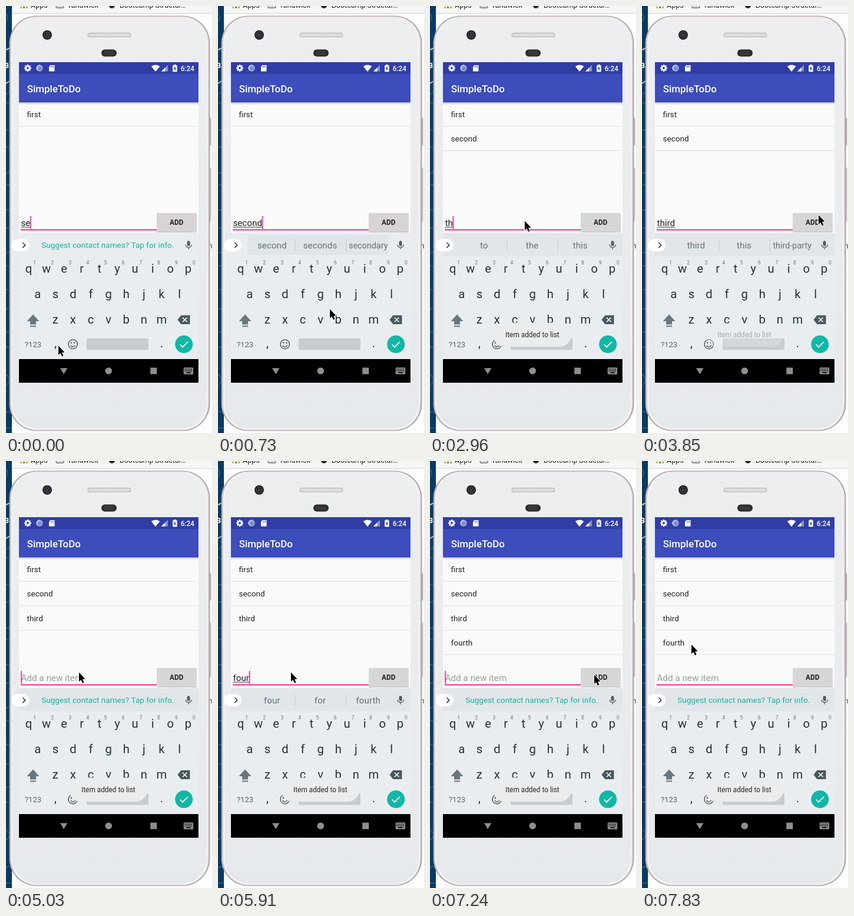
An HTML page with a canvas that plays this animation: 350 by 722 pixels, repeating every 8000 ms.

```html
<!DOCTYPE html>
<html lang="en">
<head>
<meta charset="utf-8">
<title>To-do list demo</title>
<style>
html, body { margin: 0; width: 100%; height: 100%; overflow: hidden; background: #fff; }
canvas { display: block; width: 350px; height: 722px; }
</style>
</head>
<body>
<canvas id="stage"></canvas>
<script>
const W = 350, H = 722, LOOP = 8000, STEP = 147.8, LAST = 53;
const canvas = document.getElementById('stage');
const ratio = window.devicePixelRatio || 1;
canvas.width = W * ratio;
canvas.height = H * ratio;
const ctx = canvas.getContext('2d');
const FONT = 'Roboto, "Open Sans", sans-serif';

// Timelines: [step, value]
const typed = [
  [0, 'se'], [1, 'sec'], [2, 'seco'], [3, 'secon'], [4, 'second'], [10, ''],
  [19, 't'], [20, 'th'], [21, 'thi'], [22, 'thir'], [24, 'third'], [28, ''],
  [35, 'f'], [36, 'fo'], [38, 'fou'], [40, 'four'], [41, 'fourt'], [42, 'fourth'], [48, '']
];
const words = [
  [0, ''], [1, 'second section secret'], [4, 'second seconds secondary'], [10, ''],
  [19, 'to the this'], [21, 'this thing third'], [22, 'third thirty thirst'],
  [24, 'third this third-party'], [28, ''], [38, 'four for fourth'],
  [41, 'fourth Fourth forth'], [48, '']
];
const caret = [[0, 1], [7, 0], [10, 1], [15, 0], [17, 1], [25, 0], [28, 1], [30, 0], [34, 1], [44, 0], [48, 1], [51, 0]];
const toast = [[0, 0], [10, .4], [11, 1], [25, .8], [26, .35], [27, 0], [28, .4], [29, 1], [42, .8], [43, .35], [44, 0], [48, .4], [49, 1]];
const items = [[0, 1], [10, 2], [28, 3], [48, 4]];
const names = ['first', 'second', 'third', 'fourth'];
const pointer = [
  [0, 89, 576], [3, 89, 576], [5, 190, 514], [7, 303, 359], [11, 303, 359], [13, 161, 365],
  [23, 161, 365], [24, 205, 362], [26, 300, 355], [28, 300, 356], [30, 124, 359],
  [43, 124, 359], [45, 259, 373], [47, 279, 363], [50, 279, 363], [53, 84, 312]
];

const at = (list, n) => list.filter(e => e[0] <= n).pop()[1];

function pointerAt(n) {
  const i = Math.max(1, pointer.findIndex(p => p[0] >= n));
  const [n0, x0, y0] = pointer[i - 1], [n1, x1, y1] = pointer[i];
  const k = (n - n0) / (n1 - n0);
  return [Math.round(x0 + (x1 - x0) * k), Math.round(y0 + (y1 - y0) * k)];
}

function rect(x, y, w, h, color) {
  ctx.fillStyle = color;
  ctx.fillRect(x, y, w, h);
}
function round(x, y, w, h, r, color) {
  ctx.fillStyle = color;
  ctx.beginPath();
  ctx.roundRect(x, y, w, h, r);
  ctx.fill();
}
function disc(x, y, r, color) {
  ctx.fillStyle = color;
  ctx.beginPath();
  ctx.arc(x, y, r, 0, 7);
  ctx.fill();
}
function ring(x, y, r, color, width = 1, from = 0, to = Math.PI * 2) {
  ctx.strokeStyle = color;
  ctx.lineWidth = width;
  ctx.beginPath();
  ctx.arc(x, y, r, from, to);
  ctx.stroke();
}
function trace(pts) {
  ctx.beginPath();
  for (let i = 0; i < pts.length; i += 2) ctx.lineTo(pts[i], pts[i + 1]);
}
function poly(pts, color) {
  trace(pts);
  ctx.closePath();
  ctx.fillStyle = color;
  ctx.fill();
}
function line(pts, color, width = 1) {
  trace(pts);
  ctx.strokeStyle = color;
  ctx.lineWidth = width;
  ctx.stroke();
}
function text(str, x, y, size, color, align = 'left', weight = 400) {
  ctx.font = `${weight} ${size}px ${FONT}`;
  ctx.textAlign = align;
  ctx.fillStyle = color;
  ctx.fillText(str, x, y);
}

function desktop() {
  rect(0, 0, W, H, '#fdfdfd');
  rect(10, 0, 340, 12, '#f6f6f6');
  rect(10, 12, 340, 1, '#d4d4d4');
  ['#e8b52c', '#3f9a58', '#d9a72b'].forEach((c, i) => rect(24 + i * 5, 1, 3, 3, c));
  text('Apps', 42, 3, 12.5, '#222');
  round(84.5, -8, 14, 12, 2, '#77797c');
  rect(86, -3, 11, 5.5, '#d9dadc');
  text('Tandwick', 104, 3, 12.5, '#222');
  disc(180, -1, 5, '#222');
  text('Bootcamp Structur…', 193, 3, 12.5, '#222');
  text('n', 344, 410, 12, '#333');

  ctx.save();
  ctx.beginPath();
  ctx.rect(0, 0, 10, H);
  ctx.clip();
  rect(0, 0, 10, H, '#073b63');
  for (let i = 0; i < 11; i++) ring(-6 + i * 7 % 15, 20 + i * 68, 9 + i * 5 % 9, '#3d7199', 1);
  line([0, 74, 6, 71], '#dfe8ee', 1.5);
  line([0, 131, 6, 127], '#dfe8ee', 1.5);
  text('3', -2, 105, 12, '#fff', 'left', 700);
  ctx.restore();
}

function body() {
  round(344, 189, 4.5, 47, 1.5, '#b9acb0');
  round(344, 273, 4.5, 92, 1.5, '#cbbfc3');
  round(5.5, 16.5, 341, 702, 46, '#aa9da2');
  round(7, 17.5, 338, 700, 45, '#d9ced1');
  round(9, 18.5, 334, 698, 43, '#f7f5f6');
  const face = ctx.createLinearGradient(0, 18, 0, 716);
  face.addColorStop(0, '#eceeef');
  face.addColorStop(1, '#e6e9ec');
  round(11, 19.5, 330, 695, 42, face);

  disc(70, 49, 8, '#232327');
  ring(70, 49, 5, '#55565c');
  disc(70, 49, 2.5, '#3b4256');
  round(138.5, 45, 74, 8, 4, '#bfc0c3');
  round(140, 46.5, 71, 5, 2.5, '#dddee0');
  round(162, 73.5, 26, 12, 6, '#2b2a2d');
  round(166, 75.5, 18, 8, 4, '#38373a');
}

function statusBar() {
  rect(22, 95, 305, 20, '#303da5');
  for (let i = 0; i < 8; i++) {
    const a = i * Math.PI / 4;
    line([37, 105, 37 + 6 * Math.cos(a), 105 + 6 * Math.sin(a)], '#fff', 2.4);
  }
  disc(37, 105, 4.6, '#fff');
  disc(37, 105, 1.9, '#303da5');
  disc(57, 105, 5.6, '#a9b1de');
  disc(57.5, 105.5, 3.2, '#7c87cb');
  ring(57, 105, 5, '#d8dcf2', 1, 2.4, 5);
  poly([75.5, 100, 82.5, 100, 82.5, 110.5, 73, 110.5, 73, 102.5], '#fff');
  [75.6, 77.8, 80].forEach(x => rect(x, 101.5, 1, 2.5, '#303da5'));
  ctx.fillStyle = '#fff';
  ctx.beginPath();
  ctx.moveTo(254, 111);
  ctx.lineTo(246.8, 102);
  ctx.quadraticCurveTo(254, 97, 261.5, 102);
  ctx.fill();
  poly([264, 110.5, 275, 110.5, 275, 99.5], '#8a92cd');
  poly([264, 110.5, 270.5, 110.5, 270.5, 104], '#fff');
  rect(285.2, 99, 3.6, 2, '#fff');
  round(283.2, 100.2, 7.6, 11, 1, '#fff');
  poly([287.6, 101.5, 284.8, 106.3, 286.6, 106.3, 286.4, 110, 289.2, 105.2, 287.4, 105.2], '#303da5');
  text('6:24', 320, 109.5, 11.86, '#fff', 'right', 500);
}

function app(n) {
  rect(22, 163, 305, 221, '#fafafa');
  statusBar();
  rect(22, 115, 305, 48, '#3d4dbb');
  text('SimpleToDo', 35.7, 145.5, 16.95, '#fff', 'left', 500);
  const shade = ctx.createLinearGradient(0, 163, 0, 167);
  shade.addColorStop(0, 'rgba(0,0,0,.2)');
  shade.addColorStop(1, 'rgba(0,0,0,0)');
  rect(22, 163, 305, 4, shade);

  for (let i = 0; i < at(items, n); i++) {
    const y = Math.round(41.4 * i);
    text(names[i], 35.6, 188 + y, 13.55, '#212121');
    rect(22, 203 + y, 305, 1, '#e0e0e0');
  }

  const str = at(typed, n);
  if (str) {
    text(str, 25.4, 372, 15.25, '#212121');
    rect(25.4, 373.5, ctx.measureText(str).width, 1, '#333');
  } else {
    text('Add a new item', 25.4, 372, 15.25, '#9b9b9b');
  }
  ctx.font = `400 15.25px ${FONT}`;
  if (at(caret, n)) rect(25.2 + ctx.measureText(str).width, 355, 1.7, 22, '#f32b8b');
  rect(25, 377.5, 231, 2, '#f02a8a');

  round(256, 351.5, 68, 31.5, 2, '#c9c9c9');
  round(256, 350, 68, 31.5, 2, n < 10 ? '#d8d4d6' : '#d5d7d6');
  text('ADD', 289.8, 370, 11.86, '#212121', 'center', 700);
}

function suggestions(n) {
  const list = at(words, n);
  if (n >= 10) rect(22, 385, 305, 38, '#e2e6e9');
  else if (list) rect(50, 387, 238, 34, '#e0e5e8');
  rect(22, 384, 305, 1, '#e2e4e6');

  round(10, 394, 30, 21, 10.5, '#fff');
  line([28.2, 400, 32.6, 404.4, 28.2, 408.8], '#37474f', 1.7);
  round(307.6, 397, 5, 9, 2.5, '#546067');
  ring(310.1, 403.4, 5, '#546067', 1.3, 0, Math.PI);
  rect(309.4, 408.2, 1.4, 3.2, '#546067');

  if (!list) {
    text('Suggest contact names? Tap for info.', 60.2, 409, 13.55, '#12b6a3');
    return;
  }
  list.split(' ').forEach((w, i) => {
    text(w, 91.8 + i * 81.7, 410, w.length > 8 ? 14.4 : 15.25, '#61717a', 'center');
  });
  rect(130.5, 394, 1, 21, '#c6ced2');
  rect(217, 394, 1, 21, '#c6ced2');
}

function keyboard(n) {
  rect(22, 384, 305, 213, '#e9edf0');
  suggestions(n);
  const ink = '#263238', soft = '#56646b';
  const rows = [['qwertyuiop', 38.5, 451], ['asdfghjkl', 53.8, 494], ['zxcvbnm', 83.8, 537]];
  for (const [keys, x, y] of rows) {
    [...keys].forEach((k, i) => text(k, x + i * 30.1, y, 20.3, ink, 'center'));
  }
  for (let i = 0; i < 10; i++) text((i + 1) % 10, 48.6 + i * 30.1, 437, 8.5, '#66757d', 'center');

  poly([46, 521.5, 56.5, 533, 51, 533, 51, 538.5, 41, 538.5, 41, 533, 35.5, 533], '#69777e');
  rect(41, 540.5, 10, 2, '#69777e');
  poly([297.5, 523, 312.5, 523, 312.5, 538, 297.5, 538, 291.5, 530.5], '#4a585f');
  line([300, 526.7, 307.6, 534.3], '#fff', 1.6);
  line([307.6, 526.7, 300, 534.3], '#fff', 1.6);

  text('?123', 46, 577, 13, soft, 'center');
  text(',', 84, 577, 20.3, ink, 'center');
  text('.', 264.5, 577, 20.3, ink, 'center');
  ring(113.7, 572, 7.7, soft, 1.6);
  disc(111, 569.6, 1.3, soft);
  disc(116.4, 569.6, 1.3, soft);
  ring(113.7, 572.6, 4, soft, 1.5, .2, Math.PI - .2);
  round(137, 562, 105, 19.5, 2, '#c6cccf');
  disc(302.3, 572, 15, '#10b8a5');
  line([295.8, 572.3, 300.2, 576.7, 309, 567.8], '#fff', 1.8);
}

function navBar() {
  const grey = '#8e8e8e';
  rect(22, 597, 305, 40, '#000');
  poly([92, 612.3, 104.4, 612.3, 98.2, 622.6], grey);
  disc(174.3, 617, 5.8, grey);
  rect(245.3, 611.5, 11, 11, grey);
  round(301.8, 611.3, 16.4, 11.4, 1.5, grey);
  for (let i = 0; i < 10; i++) rect(303.6 + i % 5 * 2.7, 613.4 + (i / 5 | 0) * 2.8, 1.5, 1.5, '#000');
  rect(306.3, 619, 7.5, 1.6, '#000');
}

function drawToast(alpha) {
  if (!alpha) return;
  ctx.globalAlpha = alpha;
  round(107.5, 535.5, 133, 40.5, 20.2, '#eaeced');
  text('Item added to list', 128, 560, 11.86, '#262626');
  ctx.globalAlpha = 1;
}

function arrow([x, y]) {
  ctx.save();
  ctx.translate(x, y);
  trace([0, -1.5, 0, 14, 3.4, 10.9, 5.9, 16.6, 8.6, 15.4, 6.1, 9.9, 10.6, 9.5]);
  ctx.closePath();
  ctx.lineJoin = 'round';
  ctx.lineWidth = 2;
  ctx.strokeStyle = '#fff';
  ctx.stroke();
  ctx.fillStyle = '#000';
  ctx.fill();
  ctx.restore();
}

function draw(t) {
  const n = Math.min(LAST, Math.floor((t + 10) / STEP));
  ctx.setTransform(ratio, 0, 0, ratio, 0, 0);
  desktop();
  body();
  app(n);
  keyboard(n);
  navBar();
  drawToast(at(toast, n));
  arrow(pointerAt(n));
}

const start = performance.now();
function tick() {
  draw((performance.now() - start) % LOOP);
  requestAnimationFrame(tick);
}
tick();
</script>
</body>
</html>
```
